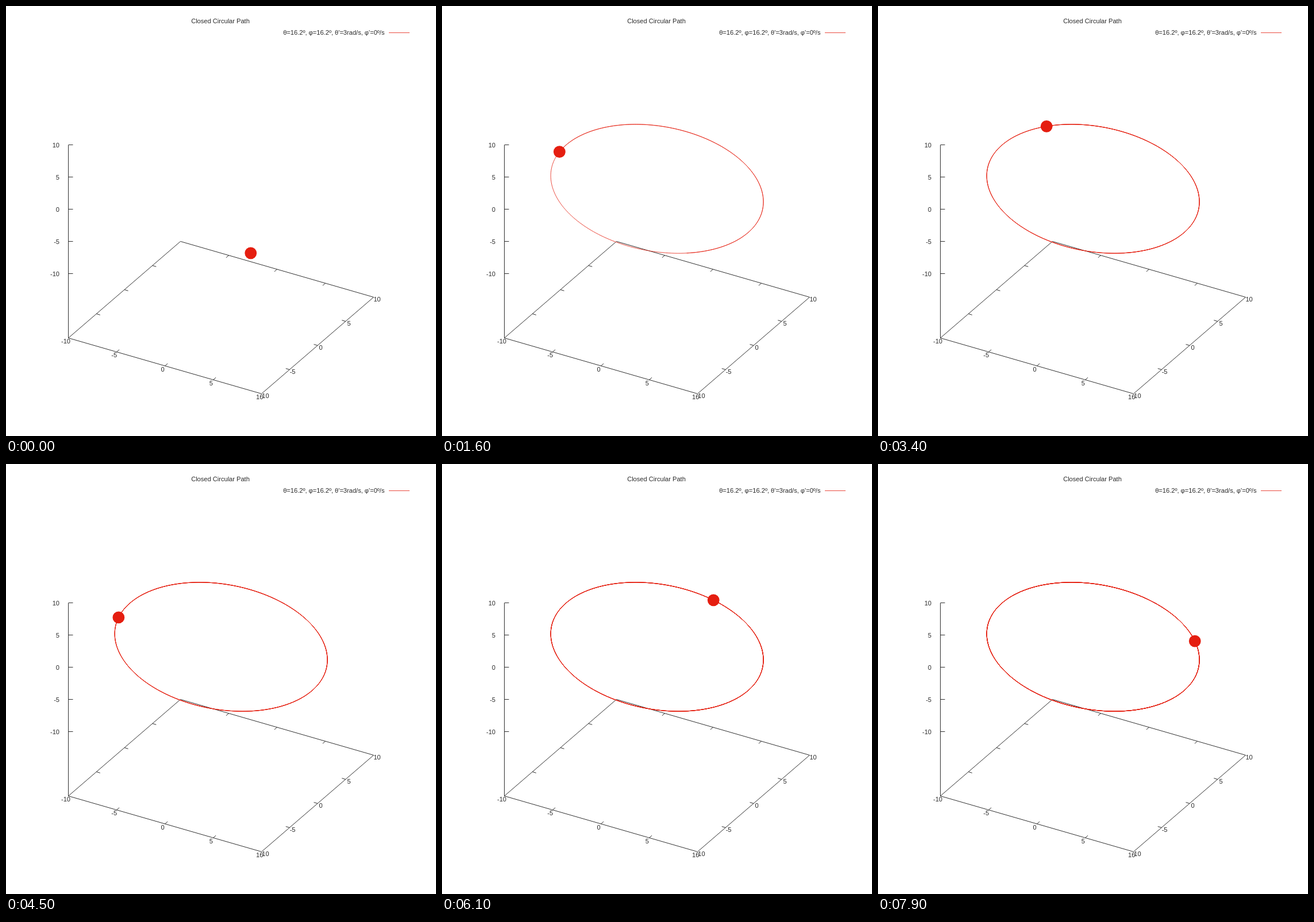
An HTML page that plays this animation: 748x748 px, repeating every 8 s.

```html
<!DOCTYPE html>
<html lang="en">
<head>
<meta charset="utf-8">
<title>Closed Circular Path</title>
<style>
  html, body { margin: 0; width: 100%; height: 100%; overflow: hidden; background: #fff; }
  svg { display: block; width: 748px; height: 748px; }
  text { font: 11.1px "Liberation Sans", Arial, sans-serif; fill: #2a2a2a; }
  .mid { text-anchor: middle; }
  .end { text-anchor: end; }
  path, polyline { fill: none; stroke-width: 1; }
  #axes { stroke: #303030; }
  .red { stroke: #e51e10; stroke-opacity: .8; stroke-linejoin: round; }
  #ball { fill: #e51e10; }
</style>
</head>
<body>
<svg viewBox="0 0 748 748">
  <text class="mid" x="373" y="30">Closed Circular Path</text>
  <text class="end" x="658.5" y="50">θ=16.2º, φ=16.2º, θ'=3rad/s, φ'=0º/s</text>
  <path class="red" d="M666 46.5H702"/>
  <path id="axes"/>
  <g id="labels"></g>
  <g id="trail"></g>
  <circle id="ball" r="10.4"/>
</svg>
<script>
const el = id => document.getElementById(id);

function add(parent, tag, attrs) {
  const node = document.createElementNS('http://www.w3.org/2000/svg', tag);
  for (const name in attrs) node.setAttribute(name, attrs[name]);
  el(parent).append(node);
  return node;
}

// Axes: base parallelogram, vertical scale and ticks
const left = [108.5, 577.5], front = [444.5, 674.5];
const right = [639.5, 506.5], back = [303.5, 409.5];
let axes = `M${left}V241.5M${left}L${front}L${right}L${back}Z`;

const tick = (x, y, dx, dy) => { axes += `M${x} ${y}l${dx} ${dy}`; };
function edgeTick(a, b, k, dx, dy) {
  tick(a[0] + (b[0] - a[0]) * k / 4, a[1] + (b[1] - a[1]) * k / 4, dx, dy);
}
function label(text, x, y, cls) {
  add('labels', 'text', { x, y, class: cls }).textContent = text;
}

for (let k = 0; k <= 4; k++) {
  const value = k * 5 - 10;
  const zy = 465.5 - 56 * k;
  tick(109, zy, 7.5, 0);
  label(value, 93, zy + 4, 'end');
  label(value, 104 + 84.3 * k, 587 + 24.25 * k, 'mid');
  label(value, 449.6 + 49 * k, 682 - 42.1 * k, 'mid');
  if (k % 4 === 0) continue;
  edgeTick(left, front, k, 4.6, -4);
  edgeTick(back, right, k, -4.6, 4);
  edgeTick(front, right, k, -6.5, -1.9);
  edgeTick(left, back, k, 6.5, 1.9);
}
el('axes').setAttribute('d', axes);

// Pendulum in a vertical plane: theta'' = -sin(theta), length equal to g
const FRAMES = 80, FRAME_MS = 100, PER_FRAME = 25, DT = 0.01;
const LENGTH = 9.81, PHI = 16.2 * Math.PI / 180;
const sideX = LENGTH * (16.8 * Math.cos(PHI) + 9.75 * Math.sin(PHI));
const sideY = LENGTH * (4.85 * Math.cos(PHI) - 8.425 * Math.sin(PHI));
const drop = LENGTH * 11.2;

function project(theta) {
  const s = Math.sin(theta), c = Math.cos(theta);
  return [374.1 + sideX * s, 318 + sideY * s + drop * c];
}

const points = [];
let theta = PHI, speed = 3;
for (let i = 0; i < FRAMES * PER_FRAME; i++) {
  points.push(project(theta));
  // velocity Verlet step
  const half = speed - Math.sin(theta) * DT / 2;
  theta += half * DT;
  speed = half - Math.sin(theta) * DT / 2;
}

// One arc per step, so later turns darken the line they retrace
const arcs = [];
for (let i = 0; i < FRAMES - 1; i++) {
  const from = i * PER_FRAME;
  const arc = points.slice(from, from + PER_FRAME + 1);
  arcs.push(add('trail', 'polyline', { class: 'red', points: arc.join(' ') }));
}

let shown = -1;
function draw(now) {
  const frame = Math.floor(Math.max(0, now - start) / FRAME_MS) % FRAMES;
  if (frame !== shown) {
    shown = frame;
    arcs.forEach((arc, i) => { arc.style.display = i < frame ? '' : 'none'; });
    const [x, y] = points[frame * PER_FRAME];
    el('ball').setAttribute('cx', x);
    el('ball').setAttribute('cy', y);
  }
  requestAnimationFrame(draw);
}
const start = performance.now();
draw(start);
</script>
</body>
</html>
```
